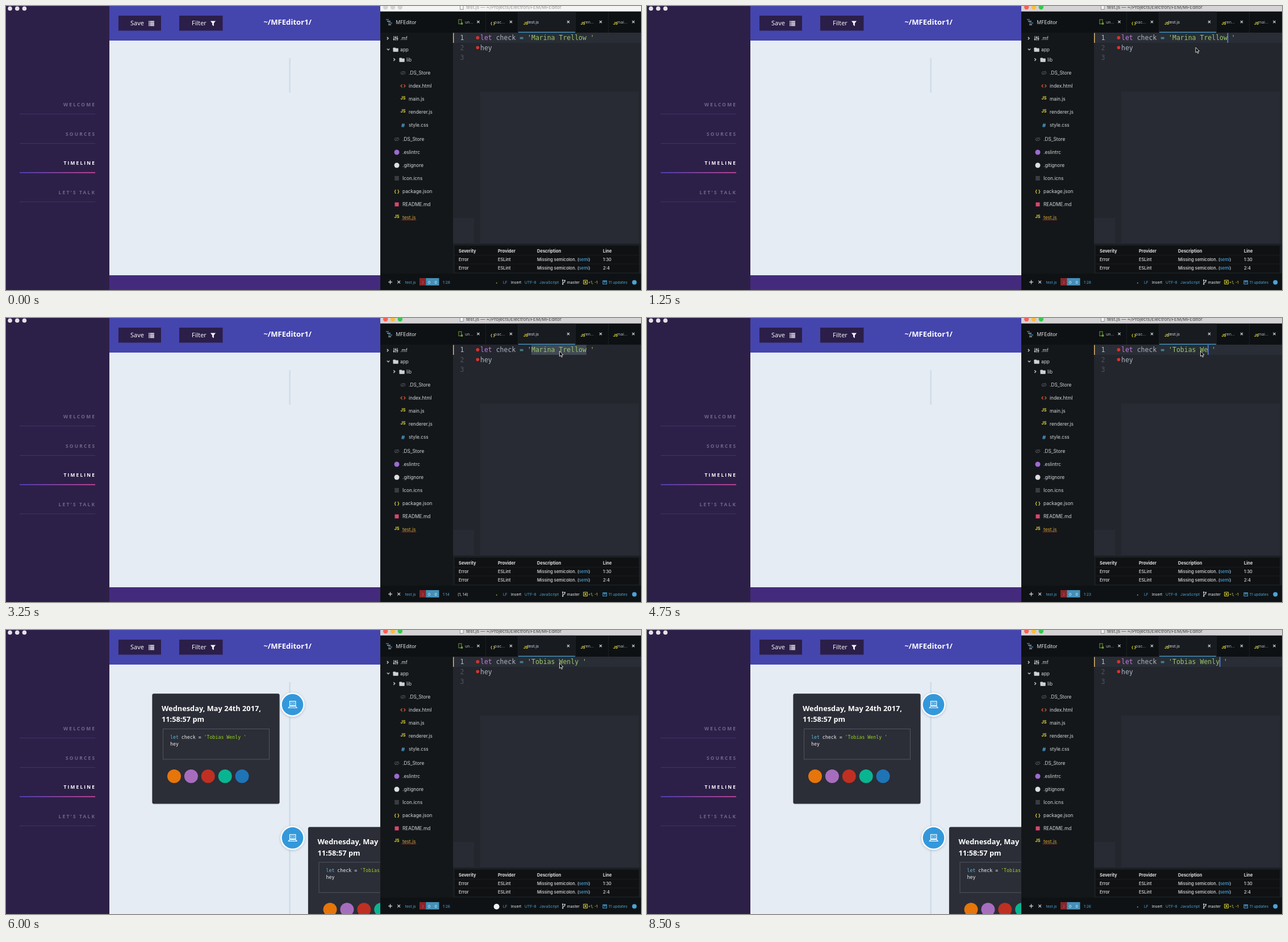
Write an HTML page with a canvas that moves like this. It is 1118 px wide and 501 px high and loops after 8750 ms.

```html
<!DOCTYPE html>
<html lang="en">
<head>
<meta charset="utf-8">
<title>Editor timeline</title>
<style>
html, body { margin: 0; width: 100%; height: 100%; overflow: hidden; background: #2d2048; }
canvas { display: block; width: 1118px; height: 501px; }
</style>
</head>
<body>
<canvas id="stage"></canvas>
<script>
const W = 1118, H = 501, LOOP = 8750, STEP = 250;
const canvas = document.getElementById('stage');
const ctx = canvas.getContext('2d');
const dpr = window.devicePixelRatio || 1;
canvas.width = W * dpr;
canvas.height = H * dpr;

const UI = 'Inter, sans-serif';
const OPEN = '"Open Sans", sans-serif';
const MONO = '"DejaVu Sans Mono", monospace';
const OLD_NAME = 'Marina Trellow', NEW_NAME = 'Tobias Wenly';
const BLUE = '#4ba3d8', YELLOW = '#e3dc3c', PALE = '#d3d6da';

// ---- helpers ----
function rect(x, y, w, h, color) {
  ctx.fillStyle = color;
  ctx.fillRect(x, y, w, h);
}

function round(x, y, w, h, r, color) {
  ctx.fillStyle = color;
  ctx.beginPath();
  ctx.roundRect(x, y, w, h, r);
  ctx.fill();
}

function dot(x, y, r, color) {
  ctx.fillStyle = color;
  ctx.beginPath();
  ctx.arc(x, y, r, 0, Math.PI * 2);
  ctx.fill();
}

function path(points, color, width = 1) {
  ctx.strokeStyle = color;
  ctx.lineWidth = width;
  ctx.beginPath();
  points.forEach(([x, y], i) => i ? ctx.lineTo(x, y) : ctx.moveTo(x, y));
  ctx.stroke();
}

function shape(points, color) {
  ctx.fillStyle = color;
  ctx.beginPath();
  points.forEach(([x, y]) => ctx.lineTo(x, y));
  ctx.fill();
}

function text(str, x, y, size, color, { font = UI, weight = 400, align = 'left', spacing = 0 } = {}) {
  ctx.font = `${weight} ${size}px ${font}`;
  ctx.textAlign = align;
  ctx.letterSpacing = spacing + 'px';
  ctx.fillStyle = color;
  ctx.fillText(str, x, y);
  ctx.letterSpacing = '0px';
}

function spans(parts, x, y, size, pitch) {
  for (const [str, color] of parts) {
    text(str, x, y, size, color, { font: MONO });
    x += str.length * pitch;
  }
}

function cross(x, y, r, color) {
  path([[x - r, y - r], [x + r, y + r]], color, 1.2);
  path([[x + r, y - r], [x - r, y + r]], color, 1.2);
}

// Last entry whose start time has passed
function at(list, t) {
  let found = list[0];
  for (const item of list) if (item[0] <= t) found = item;
  return found;
}

// ---- timeline of the session ----
const pointer = [
  [0, null], [500, [616, 262]], [750, [770, 165]], [1000, [925, 92]],
  [1250, [966, 73]], [1500, [974.5, 58.5]], [7250, [1010, 190]],
  [7500, [1075, 372]], [7750, null]
];
const selection = [[0, 0], [2500, 3], [2750, 7], [3250, 14], [3500, 0]];
const typing = [[3500, 1], [3750, 3], [4000, 5], [4250, 7], [4750, 9], [5000, 10], [5250, 12]];
const caret = [
  [0, 0], [1250, 1], [1750, 0], [2000, 1], [2500, 0], [3500, 1], [5750, 0],
  [6250, 1], [6750, 0], [7000, 1], [7250, 0], [7500, 1], [8250, 0], [8500, 1]
];

function stateAt(t) {
  const name = t < 3500 ? OLD_NAME : NEW_NAME.slice(0, at(typing, t)[1]);
  const selected = at(selection, t)[1];
  return {
    name, selected,
    col: 14 + name.length - selected,
    focus: t >= 1000,
    caret: at(caret, t)[1],
    pointer: at(pointer, t)[1],
    modified: t >= 5500 && t < 6000,
    busy: t >= 5500 && t < 6500,
    cards: t >= 6000
  };
}

// ---- left window ----
function drawNav() {
  rect(0, 0, 182, H, '#2d2048');
  [7, 19.7, 32.4].forEach(x => dot(x, 4.5, 3.8, '#e6e2e8'));
  ['WELCOME', 'SOURCES', 'TIMELINE', "LET'S TALK"].forEach((label, i) => {
    const y = 177 + i * 51.6, active = i === 2;
    text(label, 158.2, y, 8.4, active ? '#ffffff' : '#71668a',
      { font: OPEN, weight: 700, align: 'right', spacing: 2.2 });
    if (active) {
      const g = ctx.createLinearGradient(24, 0, 157, 0);
      g.addColorStop(0, '#4d3fae');
      g.addColorStop(1, '#b8418c');
      rect(24, 293, 133, 2, g);
    } else {
      rect(24, Math.round(y + 13.4), 133, 1, '#42306f');
    }
  });
}

function drawHeader() {
  rect(182, 0, 477, 61, '#4545ae');
  rect(198, 17, 75, 26.5, '#2b1f49');
  rect(305, 17, 76.5, 26.5, '#2b1f49');
  text('Save', 219, 34, 11, '#ffffff', { font: OPEN });
  text('Filter', 327, 34, 11, '#ffffff', { font: OPEN });
  for (let i = 0; i < 4; i++) {
    rect(251, 26.5 + i * 2.4, 1.6, 1.5, '#fff');
    rect(253.4, 26.5 + i * 2.4, 7.6, 1.5, '#fff');
  }
  shape([[360, 26.5], [369, 26.5], [365.8, 30.6], [365.8, 35.5], [363.2, 33.6], [363.2, 30.6]], '#fff');
  text('~/MFEditor1/', 495.7, 32.5, 13.1, '#ffffff', { font: OPEN, weight: 700, align: 'center' });
}

function drawBadge(x, y) {
  ctx.save();
  ctx.shadowColor = 'rgba(60,80,110,.3)';
  ctx.shadowBlur = 4;
  ctx.shadowOffsetY = 1;
  dot(x, y, 21.3, '#fbfdff');
  ctx.restore();
  dot(x, y, 18.8, '#3398db');
  ctx.strokeStyle = '#fff';
  ctx.lineWidth = 1.2;
  ctx.strokeRect(x - 5, y - 6, 10.4, 7.6);
  path([[x - 2.8, y - 3.6], [x + 3, y - 3.6], [x + 3, y - .8], [x - 2.8, y - .8], [x - 2.8, y - 3.6]], '#d6eaf8', .7);
  path([[x - 5, y + 2.8], [x - 7.2, y + 5.6], [x + 7.6, y + 5.6], [x + 5.4, y + 2.8], [x - 5, y + 2.8]], '#fff', 1.1);
}

function drawCard(dx, dy) {
  ctx.save();
  ctx.translate(dx, dy);
  round(257.4, 113.5, 224.2, 194, 3, '#b9c3d0');
  round(257.4, 112.3, 224.2, 194.2, 3, '#2b2d37');
  const bold = { font: OPEN, weight: 700 };
  text('Wednesday, May 24th 2017,', 274, 143, 12.8, '#ffffff', bold);
  text('11:58:57 pm', 274, 162.3, 12.8, '#ffffff', bold);
  ctx.strokeStyle = '#52545f';
  ctx.lineWidth = 1;
  ctx.strokeRect(276.5, 174.5, 187, 53.5);
  spans([['let', '#5fb9d8'], [' check = ', '#eceef0'], [`'${NEW_NAME} '`, '#95d31c']], 289, 191.5, 8.25, 4.967);
  spans([['hey', '#eceef0']], 289, 204, 8.25, 4.967);
  ['#e6750a', '#a76dbd', '#bf3022', '#09b591', '#1f74b6']
    .forEach((c, i) => dot(296 + i * 29.9, 258, 12, c));
  ctx.restore();
}

function drawTimeline(s) {
  rect(182, 61, 477, 440, '#e5ecf4');
  if (s.cards) {
    rect(498.4, 92, 2.6, 409, '#d0dde8');
    drawCard(0, 0);
    drawCard(274.5, 235.2);
    drawBadge(504.5, 131.7);
    drawBadge(504.5, 366.8);
  } else {
    round(498.4, 92, 2.6, 61, 1, '#d0dde8');
    rect(182, 475, 477, 26, '#442a7c');
  }
  drawHeader();
}

// ---- right window ----
function drawTitleBar(s) {
  rect(659, 0, 459, 9.5, s.focus ? '#d5d3d5' : '#f4f4f4');
  const lights = s.focus ? ['#fb5f57', '#fcbc40', '#34c84a'] : ['#d2d2d2', '#d2d2d2', '#d2d2d2'];
  lights.forEach((c, i) => dot(668.2 + i * 12.8, 2, 4.2, c));
  if (s.modified) dot(668.2, 2, 1.4, '#7c1512');
  rect(799, 0, 6.5, 6.5, '#8d9094');
  rect(800, 0, 4.5, 5.5, '#fafafa');
  text('test.js — ~/Projects/Electron/FEM/MFEditor', 810, 5.4, 8.2, s.focus ? '#454547' : '#98989a');
}

const tabs = [
  { x: 808, label: 'un...', close: 831.5, right: 844 },
  { x: 860, label: 'pac...', close: 889, icon: '{ }', ix: 853, right: 901 },
  { x: 918, label: 'test.js', close: 990, icon: 'JS', ix: 911, right: 1002, active: true },
  { x: 1018, label: 'ren...', close: 1047, icon: 'JS', ix: 1011.5, right: 1060 },
  { x: 1076, label: 'mai...', close: 1104.5, icon: 'JS', ix: 1069, right: 1118 }
];

function drawTabs(s) {
  rect(659, 9.5, 459, 38, '#0e1113');
  path([[669, 24], [674, 24]], '#4ba3d8', 1.2);
  path([[671, 27], [677, 27]], '#d3d6da', 1.2);
  path([[673, 30], [680, 30]], '#4ba3d8', 1.2);
  path([[673, 33], [678, 33]], '#d3d6da', 1.2);
  text('MFEditor', 686.5, 31.5, 8.5, '#e3e5e8');
  rect(901, 9.5, 101, 37.5, '#181b20');
  rect(901, 45.6, 101, 1.6, '#4597c6');
  for (const tab of tabs) {
    rect(tab.right, 10, 1, 37, '#1c2024');
    if (tab.icon) text(tab.icon, tab.ix, 32.5, 6.6, YELLOW, { weight: 700 });
    text(tab.label, tab.x, 31.2, 7.1, tab.active ? '#dfe2e6' : '#b7bbc0');
    if (tab.active && s.modified) {
      ctx.strokeStyle = '#d6b02c';
      ctx.lineWidth = 1.4;
      ctx.beginPath();
      ctx.arc(tab.close, 28.3, 2.2, 0, 7);
      ctx.stroke();
    } else {
      cross(tab.close, 28, 2.1, '#d3d6da');
    }
  }
  ctx.strokeStyle = '#6f9c3a';
  ctx.lineWidth = 1;
  ctx.strokeRect(797, 24, 5, 7.5);
  dot(802.5, 31, 2, '#6f9c3a');
}

function chevron(x, y, open) {
  path(open ? [[x - 2.2, y - 1.2], [x, y + 1.2], [x + 2.2, y - 1.2]]
            : [[x - 1.2, y - 2.2], [x + 1.2, y], [x - 1.2, y + 2.2]], PALE, 1.2);
}

const icons = {
  sliders(x, y) {
    [-3, 0, 3].forEach((d, i) => {
      path([[x + d, y - 4], [x + d, y + 4]], PALE, 1);
      rect(x + d - 1.4, y + [1, -2, 0][i], 2.8, 1.4, PALE);
    });
  },
  folder(x, y) {
    round(x - 4.5, y - 3.6, 4.5, 3, .7, '#cfd2d5');
    round(x - 4.5, y - 2.5, 9.2, 6.2, .8, '#cfd2d5');
  },
  eye(x, y) {
    ctx.strokeStyle = '#51565c';
    ctx.lineWidth = 1;
    ctx.beginPath();
    ctx.ellipse(x, y, 4, 2.3, 0, 0, 7);
    ctx.stroke();
    path([[x - 3.2, y + 3], [x + 3.2, y - 3]], '#51565c');
  },
  tag(x, y) {
    path([[x - 1.4, y - 2.6], [x - 4, y], [x - 1.4, y + 2.6]], '#dc5a34', 1.3);
    path([[x + 1.4, y - 2.6], [x + 4, y], [x + 1.4, y + 2.6]], '#dc5a34', 1.3);
  },
  js: (x, y) => text('JS', x, y + 1.2, 7.2, YELLOW, { weight: 700, align: 'center' }),
  hash: (x, y) => text('#', x, y + 3.5, 9.5, BLUE, { weight: 700, align: 'center' }),
  braces: (x, y) => text('{ }', x, y + 3, 8, YELLOW, { weight: 700, align: 'center' }),
  purple: (x, y) => dot(x, y, 4.5, '#9c6bd0'),
  white: (x, y) => dot(x, y, 4.5, '#dcdee0'),
  pink: (x, y) => rect(x - 3.5, y - 3.5, 7, 7, '#dc4570'),
  lines(x, y) {
    for (let i = -3; i <= 3; i += 2) rect(x - 3.8, y + i - .5, 7.6, .8, '#70757b');
  }
};

// label, y, indent of the icon, icon
const tree = [
  ['.mf', 57, 686, 'sliders'], ['app', 77, 686, 'folder'], ['lib', 95, 697, 'folder'],
  ['.DS_Store', 118, 699, 'eye'], ['index.html', 141, 699, 'tag'], ['main.js', 164, 699, 'js'],
  ['renderer.js', 187, 699, 'js'], ['style.css', 210, 699, 'hash'], ['.DS_Store', 235, 688, 'eye'],
  ['.eslintrc', 258, 688, 'purple'], ['.gitignore', 281, 688, 'white'], ['Icon.icns', 304, 688, 'lines'],
  ['package.json', 327, 688, 'braces'], ['README.md', 350, 688, 'pink'], ['test.js', 373, 688, 'js']
];

function drawTree() {
  rect(659, 47, 128, 425, '#14171a');
  chevron(672, 57, false);
  chevron(673, 76.5, true);
  chevron(683.5, 94.5, false);
  tree.forEach(([label, y, x, icon], i) => {
    const last = i === tree.length - 1;
    icons[icon](x, y);
    text(label, x + (i < 3 ? 8 : 10), y + 3, 8.3, last ? '#d8a53a' : '#d5d8db');
  });
  const wave = [];
  for (let x = 697; x <= 722; x++) wave.push([x, 377.2 + (x % 2 ? .5 : -.5)]);
  path(wave, '#cf4b36', 1);
}

function drawCode(s) {
  const x0 = 835, pitch = 6.923, size = 11.5;
  rect(787, 47, 331, 425, '#23262d');
  rect(835, 151, 279, 267, '#282b33');
  rect(787, 374, 37, 44, '#282b33');
  if (!s.selected) rect(788, 47, 330, 18, '#292d35');
  rect(787, 47.5, 1.5, 17.5, '#dfb672');
  ['1', '2', '3'].forEach((n, i) =>
    text(n, 799.5, 60.2 + i * 17.3, size, i ? '#50555f' : '#b4bac4', { font: MONO }));
  dot(830.4, 56, 2.9, '#d5332f');
  dot(830.4, 73.3, 2.9, '#d5332f');
  const caretX = x0 + (s.col - 1) * pitch;
  if (s.selected) rect(caretX, 47.5, s.selected * pitch, 17.5, '#424954');
  spans([['let', '#c678dd'], [' check ', '#abb2bf'], ['=', '#56b6c2'], [` '${s.name} '`, '#98c86c']],
    x0, 60.2, size, pitch);
  spans([['hey', '#abb2bf']], x0, 77.5, size, pitch);
  if (s.caret) rect(caretX - .2, 47.5, 1.5, 17.5, '#5a8cf0');
}

function drawLint() {
  rect(787, 420, 331, 52, '#1a1d21');
  rect(790, 423, 324, 47, '#0f1113');
  rect(790, 439.3, 324, 1, '#1c1f22');
  rect(790, 454.5, 324, 1, '#1c1f22');
  const cols = [797, 866, 935, 1051];
  const row = (cells, y, weight) =>
    cells.forEach((c, i) => text(c, cols[i], y, 7.5, '#dee0e2', { weight }));
  row(['Severity', 'Provider', 'Description', 'Line'], 434.7, 700);
  ['1:30', '2:4'].forEach((line, i) => {
    const y = 450 + i * 14.8, lead = 'Missing semicolon. (';
    row(['Error', 'ESLint', lead, line], y, 500);
    let x = 935 + ctx.measureText(lead).width * 0;
    ctx.font = `500 7.5px ${UI}`;
    x += ctx.measureText(lead).width;
    text('semi', x, y, 7.5, BLUE, { weight: 500 });
    x += ctx.measureText('semi').width;
    text(')', x, y, 7.5, '#dee0e2', { weight: 500 });
  });
}

function drawStatus(s) {
  const y = 489.7, size = 6.8;
  const put = (str, x, color = BLUE) => text(str, x, y, size, color);
  rect(659, 472, 459, 29, '#0f1214');
  path([[673, 487], [680, 487]], PALE, 1.3);
  path([[676.5, 483.5], [676.5, 490.5]], PALE, 1.3);
  cross(691.7, 487, 2.4, PALE);
  put('test.js' + (s.modified ? '*' : ''), 702.5);
  rect(728, 480, 11.3, 13, '#87252a');
  rect(739.3, 480, 23.2, 13, '#4590b8');
  put('2', 731.7, '#d9504d');
  put('0', 743, '#e6f1f7');
  put('0', 754.5, '#e6f1f7');
  put(`1:${s.col}`, 769);
  if (s.selected) put(`(1, ${s.selected})`, 795, '#e8eaec');
  if (s.busy) dot(863.7, 488, 5, '#eef0f1');
  else rect(863, 487.8, 1.6, 1.6, '#a7c23b');
  put('LF', 875);
  put('Insert', 889, '#eceef0');
  put('UTF-8', 913);
  put('JavaScript', 939);
  path([[980.3, 484], [980.3, 490.5]], PALE, 1.1);
  path([[980.3, 488.5], [983.8, 487], [983.8, 484.5]], PALE, 1.1);
  dot(980.3, 483.8, 1.2, PALE);
  dot(980.3, 490.5, 1.2, PALE);
  dot(983.8, 484.3, 1.2, PALE);
  put('master', 987.8, '#eceef0');
  ctx.strokeStyle = YELLOW;
  ctx.lineWidth = 1;
  ctx.strokeRect(1016.8, 483.8, 6.6, 6.6);
  dot(1020.1, 487.1, 1.5, YELLOW);
  put('+1, -1', 1024.8, YELLOW);
  ctx.strokeStyle = BLUE;
  ctx.strokeRect(1051, 484.5, 6.6, 6);
  path([[1051, 486.5], [1057.6, 486.5]], BLUE);
  path([[1054.3, 484.5], [1054.3, 488.5]], BLUE);
  put('11 updates', 1060.7);
  dot(1106.3, 487.5, 4, BLUE);
}

function drawPointer([x, y]) {
  const tip = [[0, 0], [0, 9.2], [2.1, 7.3], [3.6, 10.6], [5.1, 9.9], [3.7, 6.8], [6.5, 6.6]];
  const points = tip.map(([a, b]) => [x + a, y + b]);
  shape(points, '#0b0b0c');
  path([...points, points[0]], '#e8e8e8', .9);
}

function draw(t) {
  const s = stateAt(Math.floor(t / STEP) * STEP);
  ctx.setTransform(dpr, 0, 0, dpr, 0, 0);
  drawNav();
  drawTimeline(s);
  drawTabs(s);
  drawTitleBar(s);
  drawTree();
  drawCode(s);
  drawLint();
  drawStatus(s);
  if (s.pointer) drawPointer(s.pointer);
}

const start = performance.now();
function tick() {
  draw((performance.now() - start) % LOOP);
  requestAnimationFrame(tick);
}
tick();
</script>
</body>
</html>
```
